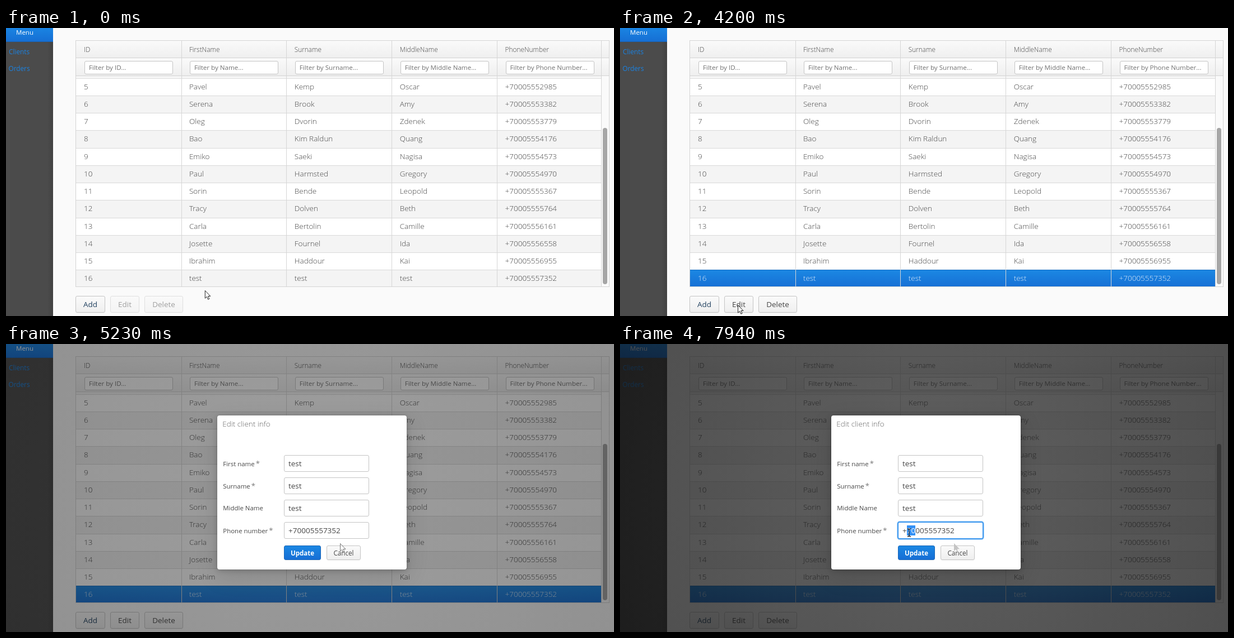
Recreate the animation shown at these times as an HTML page. Size 1085 by 516 pixels, loop 8 s.

```html
<!DOCTYPE html>
<html lang="en">
<head>
<meta charset="utf-8">
<title>Clients</title>
<style>
  html, body { margin: 0; width: 100%; height: 100%; overflow: hidden; }
  body { position: relative; background: #fafafa; color: #474747; font: 400 13.5px "Open Sans", sans-serif; white-space: nowrap; }
  div, svg { position: absolute; box-sizing: border-box; }
  #side { left: 0; top: 0; width: 84px; height: 516px; background: linear-gradient(90deg, #4b4b4b 88%, #424242); color: #1a83e4; font-size: 11.8px; }
  #menu { left: 0; top: 0; width: 84px; height: 25px; background: linear-gradient(#1a84e2, #166fd4); border-bottom: 1px solid #1a62b4; }
  #grid { left: 124px; top: 22px; width: 953px; height: 442px; border: 1px solid #d4d4d4; overflow: hidden; background: #fafafa; }
  .head { left: 0; width: 951px; background: linear-gradient(#fafafa, #efefef); border-bottom: 1px solid #d4d4d4; font-size: 11.85px; font-weight: 300; }
  .row { left: 0; width: 937px; height: 31.27px; border-top: 1px solid #d9d9d9; background: #fff; font-weight: 300; }
  .row.even { background: #f4f4f4; }
  .row.on { background: linear-gradient(#1b87e3, #166fd4); color: #d9eaf9; border-color: #1a6fc4; }
  .rule { top: 0; width: 1px; height: 442px; background: #d6d6d6; }
  #thumb { left: 1065px; top: 179px; width: 8px; height: 280px; border-radius: 4px; background: #a6a6a6; }
  .field { background: #fff; border: 1px solid #c4c4c4; border-radius: 3px; padding-left: 7px; }
  .filter { height: 24px; line-height: 22px; font-size: 11.6px; font-weight: 400; color: #707070; }
  .btn { border: 1px solid #c5c5c5; border-radius: 3px; background: linear-gradient(#fafafa, #efefef); box-shadow: 0 1px 1px #0000000d; text-align: center; }
  .big { top: 480px; height: 30px; line-height: 29px; }
  .small { top: 233px; height: 26px; line-height: 25px; font-size: 11.7px; }
  #curtain { inset: 0; background: radial-gradient(circle, #222, #0c0c0c); }
  #dialog { left: 377px; top: 128px; width: 338px; height: 276px; border-radius: 4px; background: #fff; box-shadow: 0 2px 10px #0003, 0 12px 40px #0002, 0 0 0 1px #0000000f; }
  .label { font-size: 11.45px; line-height: 30px; left: 10.3px; }
  .label span { color: #777; margin-left: 2px; font-size: 13px; }
  .focus { border-color: #2b8ded; box-shadow: 0 0 0 1.5px #57a6f0; }
  .sel { background: #3390f5; color: #fff; }
  #pulse { width: 20px; height: 20px; border-radius: 50%; background: #97f56e; }
  svg { left: 0; top: 0; overflow: visible; width: 1px; height: 1px; }
</style>
</head>
<body>
<div id="side">
  <div id="menu"></div>
  <div style="left:18px;top:-2px;line-height:20px;color:#fff;font-size:11.5px">Menu</div>
  <div style="left:5px;top:32px;line-height:20px">Clients</div>
  <div style="left:4.5px;top:62px;line-height:20px">Orders</div>
</div>
<div id="grid"></div>
<div id="thumb"></div>
<div class="btn big" style="left:124px;width:53px;color:#1f3f5e">Add</div>
<div class="btn big" id="edit" style="left:186px;width:52px">Edit</div>
<div class="btn big" id="del" style="left:247px;width:69px">Delete</div>
<div id="curtain"></div>
<div id="dialog">
  <div style="left:9.3px;top:5px;line-height:20px;font-weight:300;color:#666">Edit client info</div>
  <div class="btn small" style="left:119px;width:66px;color:#fff;font-weight:700;font-size:11.5px;background:linear-gradient(#1b87e3,#166ed5);border-color:#1a66b8">Update</div>
  <div class="btn small" style="left:195px;width:61px">Cancel</div>
</div>
<svg id="ghost"><path fill="#c4c4c4" d="M0 0V14L3.2 11 5 14H7L5.6 10.2H10Z"/></svg>
<div id="pulse"></div>
<svg id="arrow"><path fill="#fff" stroke="#222" d="M.5 .5V14.2L3.6 11.3 5.8 16.3 8 15.3 5.9 10.5H10Z"/></svg>
<svg id="beam"><path fill="none" stroke="#222" stroke-width="1.3" d="M-3-7Q0-7 0-5V5Q0 7-3 7M3-7Q0-7 0-5V5Q0 7 3 7"/></svg>
<script>
const $ = id => document.getElementById(id);
const LOOP = 8000, COL = 187.9, ROW = 31.27;

function add(parent, cls, style, html = '') {
  const el = document.createElement('div');
  el.className = cls;
  el.style.cssText = style;
  el.innerHTML = html;
  parent.append(el);
  return el;
}

// Table
const grid = $('grid');
const phone = id => '+7000555' + (1000 + id * 397 % 9000);
const clients = `Pavel,Kemp,Oscar
Serena,Brook,Amy
Oleg,Dvorin,Zdenek
Bao,Kim Raldun,Quang
Emiko,Saeki,Nagisa
Paul,Harmsted,Gregory
Sorin,Bende,Leopold
Tracy,Dolven,Beth
Carla,Bertolin,Camille
Josette,Fournel,Ida
Ibrahim,Haddour,Kai
test,test,test`.split('\n').map((line, i) => [i + 5, ...line.split(','), phone(i + 5)]);

const cell = (parent, i, text, height) =>
  add(parent, '', `left:${i * COL + 14}px;top:0;line-height:${height}px`, text);

add(grid, 'row even', `top:${66.5 - ROW}px`);
let lastRow;
clients.forEach((client, r) => {
  lastRow = add(grid, r % 2 ? 'row even' : 'row', `top:${66.5 + r * ROW}px`);
  client.forEach((text, i) => cell(lastRow, i, text, 29));
});
const titles = add(grid, 'head', 'top:0;height:31px');
const filters = add(grid, 'head', 'top:31px;height:32px');
['ID', 'FirstName', 'Surname', 'MiddleName', 'PhoneNumber'].forEach((title, i) => {
  cell(titles, i, title, 31);
  const hint = ['ID', 'Name', 'Surname', 'Middle Name', 'Phone Number'][i];
  add(filters, 'field filter', `left:${i * COL + 15}px;top:5px;width:158px`, `Filter by ${hint}...`);
  add(grid, 'rule', `left:${i < 4 ? (i + 1) * COL - .4 : 937}px`);
});

// Dialog form
const dialog = $('dialog');
const digits = [...phone(16)].map(c => `<span>${c}</span>`).join('');
let phoneField;
['First name', 'Surname', 'Middle Name', 'Phone number'].forEach((text, i) => {
  const top = 70.5 + i * 40.2;
  add(dialog, 'label', `top:${top}px`, text + (i === 2 ? '' : '<span>*</span>'));
  phoneField = add(dialog, 'field', `left:119px;top:${top}px;width:152px;height:30px;line-height:29px`, i === 3 ? digits : 'test');
});

// Pointer keys: time, x, y
const path = [
  [0, 355, 470], [400, 272, 480], [600, 272, 480], [860, 204, 498], [1180, 308, 500],
  [1430, 240, 474], [1590, 215, 500], [1830, 228, 476], [2080, 335, 500], [2310, 294, 484],
  [2710, 248, 453], [2820, 248, 453], [2950, 267, 453], [3780, 267, 453], [4200, 210, 496],
  [4280, 216, 497], [5090, 216, 497], [5220, 596, 357], [5310, 596, 357], [5770, 530, 339],
  [5980, 530, 339], [6080, 536, 338], [6230, 536, 337], [6390, 532, 334], [6540, 531, 334],
  [6980, 531, 335], [7170, 525, 338], [7330, 525, 338], [7400, 515, 341], [7520, 515, 341],
  [7710, 508, 340], [7870, 508, 340], [7940, 516, 338]
];
const clicks = [[3410, 267, 454], [4670, 216, 498], [6770, 531, 335]];

const clamp = v => Math.max(0, Math.min(1, v));
const show = (el, opacity) => { el.style.opacity = opacity; };
const place = (el, x, y) => { el.style.transform = `translate(${x}px,${y}px)`; };

function pointer(t) {
  const next = path.findIndex(key => key[0] > t);
  if (next < 0) return path.at(-1).slice(1);
  const [t0, x0, y0] = path[next - 1], [t1, x1, y1] = path[next];
  const p = (t - t0) / (t1 - t0);
  return [x0 + (x1 - x0) * p, y0 + (y1 - y0) * p];
}

function render(t) {
  const [x, y] = pointer(t);
  const typing = t >= 5310;
  place($('arrow'), x, y);
  place($('beam'), x, y);
  show($('arrow'), typing ? 0 : t >= 5210 ? .6 : 1);
  show($('beam'), typing ? 1 : 0);
  place($('ghost'), 596, 357);
  show($('ghost'), typing ? 1 : 0);

  const click = clicks.find(c => t >= c[0] && t < c[0] + 320);
  show($('pulse'), click ? clamp((320 - t + click[0]) / 200) : 0);
  if (click) place($('pulse'), click[1] - 10, click[2] - 10);

  lastRow.classList.toggle('on', t >= 3560);
  const enabled = t >= 3640;
  show($('edit'), enabled ? 1 : .5);
  show($('del'), enabled ? 1 : .5);
  const pressed = t >= 4670 && t < 5200;
  $('edit').style.color = pressed ? '#2d6b62' : '';
  $('edit').style.borderColor = pressed ? '#9fb0b8' : '';

  show(dialog, clamp((t - 4930) / 145));
  show($('curtain'), .72 * (1 - (1 - clamp((t - 5080) / 400)) ** 2));

  phoneField.classList.toggle('focus', t >= 6770);
  const from = t < 7090 ? 3 : t < 7400 ? 2 : t >= 7630 && t < 7940 ? 0 : 1;
  [...phoneField.children].forEach((s, i) => { s.className = i >= from && i < 3 ? 'sel' : ''; });
}

const start = performance.now();
function frame() {
  render((performance.now() - start) % LOOP);
  requestAnimationFrame(frame);
}
frame();
</script>
</body>
</html>
```
